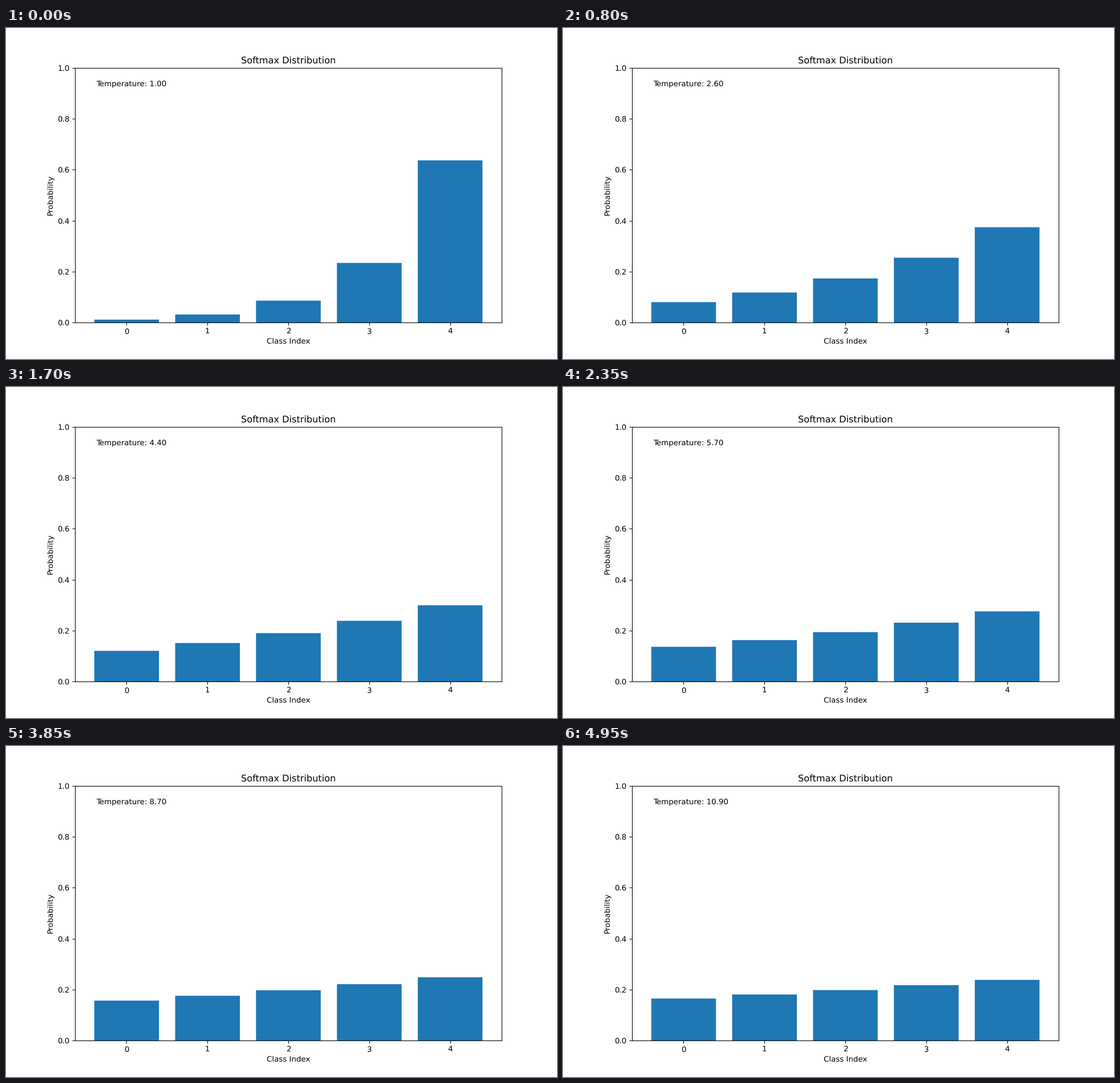
A matplotlib script for the animation above (5 s loop, 966 by 580 pixels).

```python
import numpy as np
import matplotlib.pyplot as plt
from matplotlib.animation import FuncAnimation

WIDTH, HEIGHT = 966, 580
DPI = WIDTH / 10
FRAMES = 100
INTERVAL = 50

plt.rcParams["text.hinting"] = "none"

logits = np.arange(5.0)


def softmax(x, temperature):
    e = np.exp((x - x.max()) / temperature)
    return e / e.sum()


fig, ax = plt.subplots(figsize=(WIDTH / DPI, HEIGHT / DPI), dpi=DPI)
bars = ax.bar(np.arange(len(logits)), softmax(logits, 1.0), snap=False)
ax.set_ylim(0, 1)
ax.set_title("Softmax Distribution")
ax.set_xlabel("Class Index")
ax.set_ylabel("Probability")
label = ax.text(0.05, 0.95, "", transform=ax.transAxes, va="top")


def update(i):
    temperature = 1 + 0.1 * i
    for bar, p in zip(bars, softmax(logits, temperature)):
        bar.set_height(p)
    label.set_text(f"Temperature: {temperature:.2f}")
    return [*bars, label]


anim = FuncAnimation(fig, update, frames=FRAMES, interval=INTERVAL,
                     repeat=True, repeat_delay=0)
plt.show()
```
